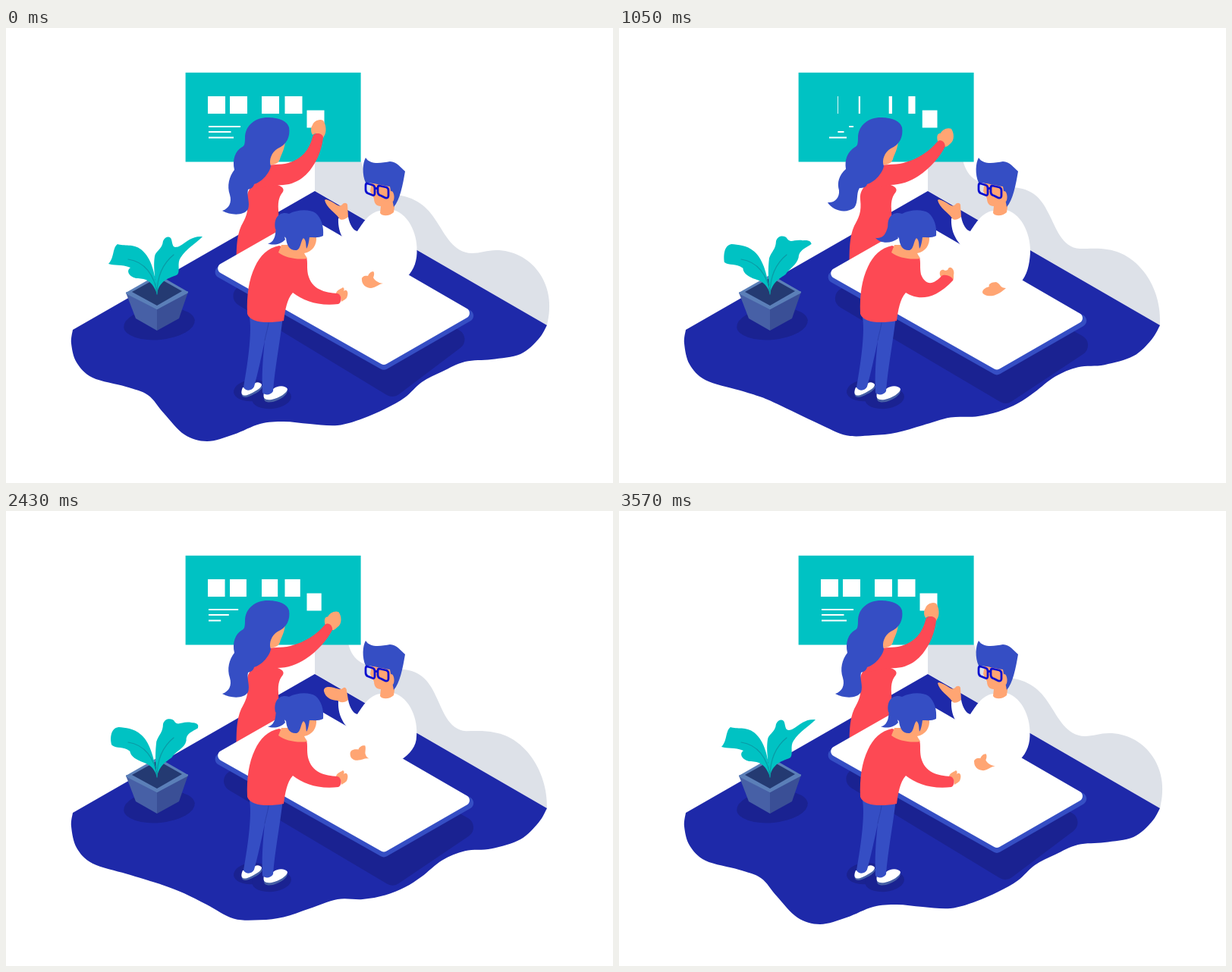
Recreate the animation shown at these times as an HTML page with a canvas. Size 800 px wide and 600 px high, loop 3600 ms.

```html
<!DOCTYPE html>
<html lang="en">
<head>
<meta charset="utf-8">
<title>Team at work</title>
<style>
html, body { margin: 0; width: 100%; height: 100%; overflow: hidden; background: #fff }
canvas { display: block }
</style>
</head>
<body>
<canvas width="800" height="600"></canvas>
<script>
const ctx = document.querySelector('canvas').getContext('2d');
const LOOP = 3600;
const RED = '#fd4954', BLUE = '#354ec4', SKIN = '#ffa573', TEAL = '#00c2c3',
  NAVY = '#1e29a9', SHADE = '#1a2291', GREY = '#dde1e8', WHITE = '#fff';

// Timing helpers
const clamp = (v, lo = 0, hi = 1) => Math.min(hi, Math.max(lo, v));
const lerp = (a, b, k) => a + (b - a) * k;
const ramp = (t, a, b) => (1 - Math.cos(Math.PI * clamp((t - a) / (b - a)))) / 2;
const pulse = (t, a, b, c, d) => ramp(t, a, b) - ramp(t, c, d);

// Blend two path strings of the same structure
function mix(a, b, k) {
  const target = b.match(/-?[\d.]+/g);
  let i = 0;
  return a.replace(/-?[\d.]+/g, v => lerp(+v, +target[i++], k));
}

function fill(path, color) {
  ctx.fillStyle = color;
  ctx.fill(path instanceof Path2D ? path : new Path2D(path));
}

function line(path, color, width) {
  ctx.strokeStyle = color;
  ctx.lineWidth = width;
  ctx.lineJoin = ctx.lineCap = 'round';
  ctx.stroke(new Path2D(path));
}

function oval(x, y, rx, ry, color) {
  ctx.fillStyle = color;
  ctx.beginPath();
  ctx.ellipse(x, y, rx, ry, -0.1, 0, 7);
  ctx.fill();
}

function roundedQuad(points, radius, color) {
  const [a, b] = points;
  ctx.beginPath();
  ctx.moveTo((a[0] + b[0]) / 2, (a[1] + b[1]) / 2);
  for (let i = 1; i <= 4; i++) ctx.arcTo(...points[i % 4], ...points[(i + 1) % 4], radius);
  ctx.closePath();
  ctx.fillStyle = color;
  ctx.fill();
}

// Lower rim of the floor: x, y at rest, y at full swell
const rim = [
  [713, 392, 392], [702, 410, 411], [678, 430, 434], [640, 437, 448], [605, 440, 451], [575, 453, 463],
  [548, 467, 487], [526, 487, 499], [500, 502, 508], [470, 515, 511], [437, 524, 508], [400, 522, 525],
  [366, 519, 541], [335, 522, 545], [300, 536, 538], [265, 545, 511], [235, 536, 494], [208, 508, 489],
  [187, 484, 488], [158, 473, 480], [114, 461, 466], [93, 441, 445], [86, 416, 416], [88, 398, 398]];

function floorPath(swell) {
  const pts = rim.map(([x, a, b]) => [x, lerp(a, b, swell)]);
  const path = new Path2D('M407 215');
  path.lineTo(...pts[0]);
  for (let i = 0; i < pts.length - 1; i++) {
    const b = pts[i], c = pts[i + 1], a = pts[i - 1] || b, d = pts[i + 2] || c;
    path.bezierCurveTo(b[0] + (c[0] - a[0]) / 6, b[1] + (c[1] - a[1]) / 6,
      c[0] - (d[0] - b[0]) / 6, c[1] - (d[1] - b[1]) / 6, ...c);
  }
  path.closePath();
  return path;
}

// Board items: x, y, width, height, time of leaving, time of entering
const notes = [
  [266, 90, 23, 23, 631, 1785], [295, 90, 23, 23, 668, 1820], [337, 90, 23, 23, 708, 1850],
  [367.5, 90, 23, 23, 779, 1880], [396.5, 108.5, 23, 23, 933, 1910],
  [267, 129, 42, 2, 687, 1840], [267, 136, 29.5, 2, 740, 1860], [267, 143.5, 33, 2, 873, 2080]];

function drawBoard(t) {
  ctx.fillStyle = TEAL;
  ctx.fillRect(236.6, 58.8, 231, 117.7);
  ctx.fillStyle = WHITE;
  for (const [x, y, w, h, leave, enter] of notes) {
    const from = t < 1600 ? ramp(t, leave, leave + 480) : 0;
    const to = t < 1600 ? 1 : ramp(t, enter, enter + 710);
    ctx.fillRect(x + w * from, y, w * (to - from), h);
  }
}

function drawPresenter(t) {
  const reach = pulse(t, 630, 1160, 2300, 3060), swing = pulse(t, 630, 1050, 1450, 2250);
  fill(mix(
    'M404 141C401 136 402 130 404 128C405 124 412 119 418 122C422 127 423 138 419 143C418 145 418 146 417 145C416 139 408 137 404 141Z',
    'M422 151C420 143 422 140 426 140C428 136 434 132 440 134C444 139 445 150 438 154C435 157 433 158 431 158C430 152 426 148 422 151Z',
    reach), SKIN);
  fill('M340 182C352 180 358 190 358 207C364 209 367 212 365 216C361 221 358 227 359 240L362 330L304 330C303 290 304 275 310 261C316 250 320 243 318 226C317 216 322 211 326 205Z', RED);
  fill(mix(
    'M340 182C352 179 360 181 372 178C390 173 400 160 404 144C405 137 417 138 418 144C416 165 405 187 390 198C380 205 370 208 356 207L330 212Z',
    'M340 182C352 179 362 181 375 178C395 173 411 162 421 151C426 146 432 152 431 158C424 170 412 184 395 195C384 202 372 207 356 207L330 212Z',
    reach), RED);
  fill('M350 158L368 146C368 160 363 165 361 173C359 179 353 181 346 180Z', SKIN);
  fill(mix(
    'M345 118C329 118 315 128 315 145C315 153 314 156 311 157C302 162 298 174 301 187C294 196 291 208 295 220C298 230 294 238 285 241C296 247 313 248 319 239C322 230 317 222 319 213C323 212 326 210 327 206C338 203 348 190 349 182C346 174 350 164 358 159C370 154 375 143 373 131C370 121 356 118 345 118Z',
    'M345 118C329 118 315 128 315 145C315 153 314 156 311 157C301 163 297 174 299 186C290 194 287 204 290 214C291 224 284 231 275 230C281 240 298 246 310 237C316 229 312 219 317 211C322 211 326 210 327 206C338 203 348 190 349 182C346 174 350 164 358 159C370 154 375 143 373 131C370 121 356 118 345 118Z',
    swing), BLUE);
}

function drawPlant(swell) {
  fill('M158 349L200 325L240 348L199 372Z', '#5b7fb8');
  fill('M166 348L200 329L232 347L199 366Z', '#243a72');
  fill('M158 349L199 371V399L171 383Z', '#4760a6');
  fill('M240 348L199 371V399L228 383Z', '#3a4f96');
  line('M159.5 349.5L199 369.5L238.5 348.5', '#5b7fb8', 3);
  fill(mix(
    'M199 350C197 325 192 303 178 292C168 284 155 288 147 285C140 290 143 303 135 311C143 314 152 311 164 316C157 321 164 329 172 330C182 331 191 330 199 350Z',
    'M199 350C195 330 191 308 178 296C168 287 158 285 149 285C136 285 135 302 141 308C147 314 155 309 163 317C167 325 175 328 184 332C190 335 196 340 199 350Z',
    swell), TEAL);
  fill(mix(
    'M199 350C196 325 194 315 196 301C197 294 206 292 207 281C210 274 217 274 218 279C220 286 219 291 228 288C240 281 245 274 259 275C252 283 237 291 230 303C225 310 230 320 226 325C220 329 203 330 199 350Z',
    'M199 350C196 330 198 315 199 305C203 295 207 292 207 281C209 271 222 273 224 278C230 283 236 272 250 276C260 279 256 287 251 290C243 294 237 294 240 303C239 314 222 315 216 325C210 330 203 335 199 350Z',
    swell), TEAL);
  line('M161 305C182 308 196 325 199 351C199 327 206 311 221 299', '#0a9aa5', 1.2);
}

function drawMan(t, arm) {
  fill(mix(
    'M493 241C478 243 470 258 463 268C458 267 453 260 451 249L438 251C437 272 447 288 472 304L519 329C533 320 541 310 541 297C543 275 533 247 511 240C506 249 496 249 493 241Z',
    'M493 241C478 243 470 258 463 268C458 267 453 260 451 249L438 251C437 272 447 288 472 304L529 336C538 326 541 312 542 297C543 275 533 247 511 240C506 249 496 249 493 241Z',
    (arm + 1) / 2), WHITE);
  fill(mix(
    'M420 227C421 225 428 228 434 232C438 235 441 235 443 233C445 230 449 230 450 233L451 249C447 253 441 254 439 251C435 244 422 237 420 227Z',
    'M419 238C418 232 425 231 432 233C438 235 442 236 445 233C447 232 449 234 449 237L451 249C447 253 440 253 437 250C430 250 421 247 419 238Z',
    pulse(t, 1050, 1700, 2380, 2950)), SKIN);
  fill('M482 203L507 207L512 236L511 243C506 248 496 249 493 244L494 235C488 235 485 231 485 225L480 215Z', SKIN);
  fill('M474 171C470 178 469 193 474 204C485 204 496 208 506 209L511 236C519 227 523 207 526 189C521 185 515 176 506 176C495 178 480 181 474 171Z', BLUE);
  oval(508.5, 222, 3, 7, SKIN);
  line('M476 205L483 207Q486 208 486 211V218Q486 222 482 220L477 218Q474 217 474 213V208Q474 205 476 205ZM492 208L501 210Q504 211 504 214V221Q504 225 500 224L494 221Q490 220 490 216V211Q490 208 492 208ZM486 211L490 212', '#0b10cf', 2.8);
}

function drawTablet(drop) {
  ctx.save();
  ctx.translate(0, drop * 7);
  roundedQuad([[395, 262], [266, 321], [498, 452], [625, 379]], 8, BLUE);
  roundedQuad([[395, 247], [272, 317], [498, 445], [618, 376]], 7, WHITE);
  ctx.restore();
}

function drawManHand(arm) {
  const rest = 'M469 332C468 328 473 326 477 327C478 324 481 321 484 321C486 323 485 327 484 329C486 333 490 336 497 337C492 337 488 342 481 343C474 343 469 338 469 332Z';
  const away = 'M479 348C480 344 484 342 488 341C486 338 491 335 497 335C499 336 501 337 502 339C504 342 507 343 510 343C506 347 498 352 493 353C486 354 479 352 479 348Z';
  const near = 'M453 320C453 315 457 313 464 314C465 310 470 308 473 309C474 312 473 316 473 319C474 324 476 325 478 326C472 325 468 328 464 328C458 329 453 326 453 320Z';
  fill(mix(rest, arm > 0 ? away : near, Math.abs(arm)), SKIN);
}

function drawGirl(t) {
  const lift = pulse(t, 0, 550, 1500, 2150), swing = pulse(t, 0, 600, 800, 1500);
  const sole = '#4760a6';
  fill('M311 479C309 487 314 488 320 486C330 482 338 477 338 472Z', sole);
  fill('M312 474C308 483 312 486 318 484C328 480 338 474 337 470C334 466 328 466 325 472Z', WHITE);
  fill('M340 486C339 494 345 494 352 493C362 490 371 484 371 478Z', sole);
  fill('M340 481C338 489 342 491 350 490C360 488 371 481 371 476C368 471 358 471 352 476Z', WHITE);
  fill('M321 382C324 400 320 435 313 474C316 479 324 479 327 473C332 455 337 432 341 412C338 440 337 460 338 481C342 485 349 484 352 479C354 450 361 415 365 380Z', BLUE);
  line('M341 412C343 402 345 396 346 389', '#2a3fae', 1);

  fill(mix(
    'M435 350C436 345 442 344 444 342C446 343 446 345 445 347C450 343 452 350 449 356C446 359 443 360 442 361C442 355 440 350 435 350Z',
    'M424 328C421 322 424 318 428 319C431 321 434 319 434 317C438 313 443 320 441 326C441 330 441 332 440 333C437 328 430 325 424 328Z',
    lift), SKIN);
  fill(mix(
    'M360 287C345 290 335 300 328 315C320 332 317 352 318 377C322 389 345 390 366 386C368 372 370 358 378 349C392 360 412 367 438 364C443 362 443 352 437 350C420 349 403 345 398 325C396 315 398 310 396 302Z',
    'M360 287C345 290 335 300 328 315C320 332 317 352 318 377C322 389 345 390 366 386C368 372 370 358 378 349C392 358 414 361 440 333C442 329 430 323 425 327C416 337 405 342 398 325C396 315 398 310 396 302Z',
    lift), RED);
  fill('M386 274L409 275C410 286 404 295 393 297L397 304C384 306 368 303 359 296L363 286L374 286Z', SKIN);
  fill(mix(
    'M360 248C354 258 357 272 353 278C351 282 348 284 345 284C351 287 362 286 368 279Z',
    'M360 248C354 258 353 266 348 271C345 274 340 275 335 274C341 283 356 285 368 277Z',
    swing), BLUE);
  fill('M355 265C352 250 361 241 373 245C385 239 400 239 408 244C416 251 419 262 418 274C413 277 406 276 400 276C399 283 398 288 396 291C395 286 396 280 392 277C388 281 389 291 383 293C375 294 370 288 369 277Z', BLUE);
}

function draw(t) {
  const half = 1 - Math.abs(1 - t / 1800);
  const swell = half < .5 ? 2 * half * half : 1 - 2 * (1 - half) ** 2;
  const drop = (1 - Math.cos(t / 1800 * 2 * Math.PI)) / 2;
  const arm = clamp(Math.sin(t / LOOP * 2 * Math.PI) * 1.08, -1, 1);

  ctx.fillStyle = WHITE;
  ctx.fillRect(0, 0, 800, 600);
  fill(mix(
    'M407 176L468 176C475 200 490 218 515 220C545 224 558 240 568 256C578 271 590 297 614 297C625 297 634 293 646 293C690 293 728 335 713 392L407 215Z',
    'M407 176L446 176C451 196 464 206 522 205C542 205 555 213 566 240C574 257 580 286 604 288C618 288 630 288 644 292C680 300 710 345 713 392L407 215Z',
    swell), GREY);
  drawBoard(t);

  const floor = floorPath(swell);
  line('M407 215L712 392', WHITE, 1);
  fill(floor, NAVY);
  ctx.save();
  ctx.clip(floor);
  roundedQuad([[400, 287], [lerp(286, 269, drop), lerp(353, 356, drop)], [510, lerp(489, 498, drop)],
    [lerp(616, 632, drop), lerp(409, 418, drop)]], 14, SHADE);
  oval(202, 390, 47, 21, SHADE);
  oval(324, 478, 24, 14, SHADE);
  oval(350, 488, 26, 14, SHADE);
  ctx.restore();

  drawPresenter(t);
  drawPlant(swell);
  drawMan(t, arm);
  drawTablet(drop);
  drawManHand(arm);
  drawGirl(t);
}

function tick() {
  draw(performance.now() % LOOP);
  requestAnimationFrame(tick);
}
tick();
</script>
</body>
</html>
```
